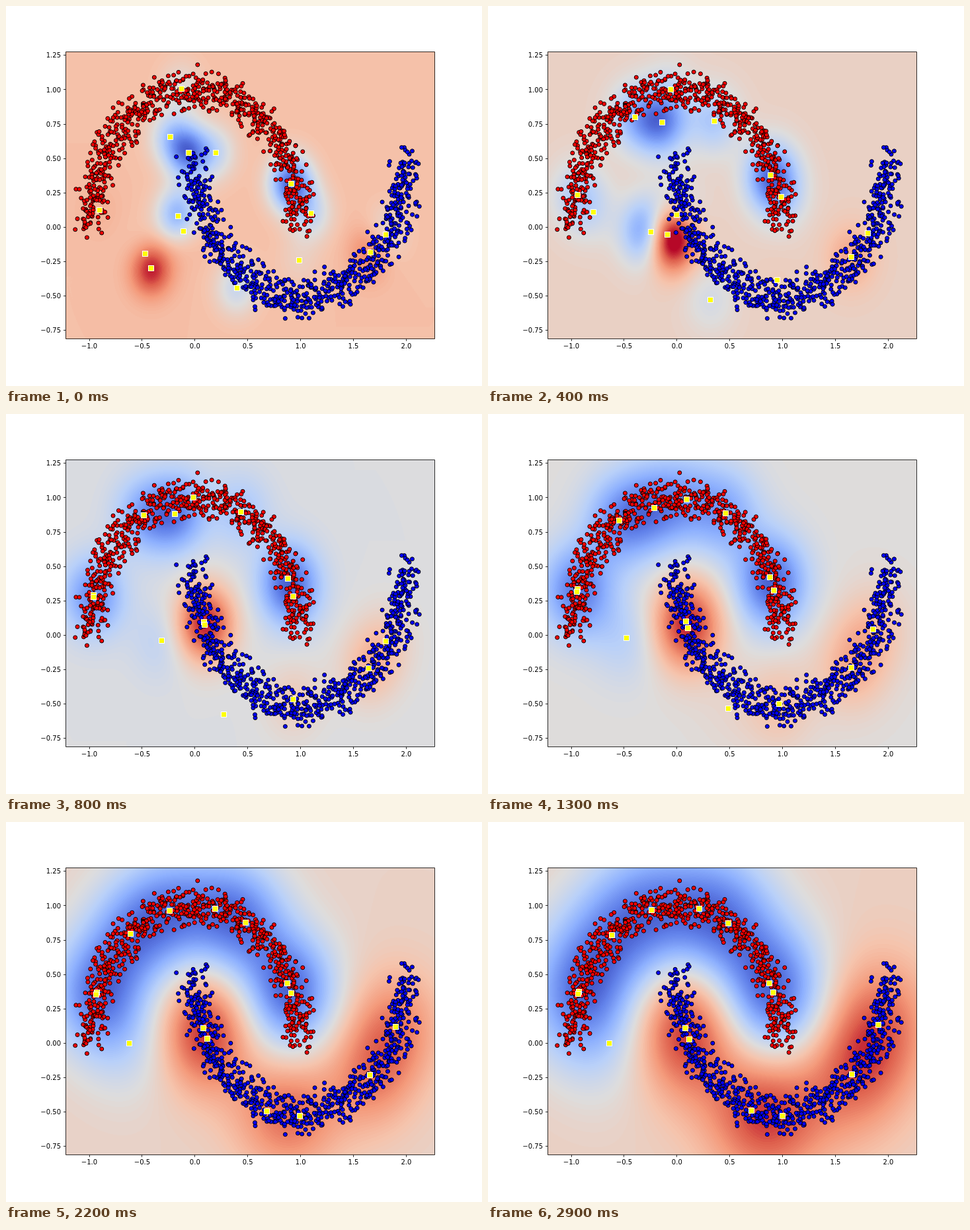
An HTML page with a canvas that plays this animation: 720x576 px, repeating every 3 s.

```html
<!DOCTYPE html>
<html lang="en">
<head>
<meta charset="utf-8">
<title>Two moons classifier</title>
<style>
  html, body { margin: 0; width: 100%; height: 100%; overflow: hidden; background: #fff; }
  canvas, svg { position: absolute; left: 0; top: 0; display: block; }
  text { font: 10px "DejaVu Sans", sans-serif; }
  .axes { fill: none; stroke: #000; stroke-width: .8; }
</style>
</head>
<body>
<canvas id="plot" width="720" height="576"></canvas>
<svg id="frame" width="720" height="576"></svg>
<script>
const STEP = 100, STEPS = 30, MID = 8, END = STEPS - 1;
const BOX = { x: 90, y: 69, w: 559, h: 436 };
const UNIT = { x: 159.8, y: 208.5 };
const px = x => 285.8 + x * UNIT.x;
const py = y => 335.4 - y * UNIT.y;

const clamp = s => Math.max(0, Math.min(1, s));
const mix = (a, b, s) => a + (b - a) * s;
const smooth = s => s * s * (3 - 2 * s);
const easeOut = power => s => 1 - (1 - s) ** power;
const approach = easeOut(1.5), settle = easeOut(2.5);

// The two half circles: their final field level and how the level gets there.
const UPPER = { color: '#f00', level: .05, ease: settle, at: (c, s) => [c, s] };
const LOWER = { color: '#00f', level: .92, ease: smooth, at: (c, s) => [1 - c, .5 - s] };

function onMoon(moon, degrees, radius = 1) {
  const a = degrees * Math.PI / 180;
  const [x, y] = moon.at(radius * Math.cos(a), radius * Math.sin(a));
  return { x: px(x), y: py(y) };
}

// An inducing point first reaches its moon, then settles along it.
function marker(moon, x, y, level, midLevel, mid, end, endLevel = moon.level) {
  const poses = [
    { x, y, level },
    { ...onMoon(moon, ...mid), level: midLevel },
    { ...onMoon(moon, ...end), level: endLevel }
  ];
  return t => {
    const early = t < MID, s = early ? t / MID : (t - MID) / (END - MID);
    const [a, b] = early ? poses : poses.slice(1);
    const move = early ? approach(s) : settle(s);
    return {
      x: mix(a.x, b.x, move),
      y: mix(a.y, b.y, move),
      level: mix(a.level, b.level, early ? approach(s) : moon.ease(s))
    };
  };
}

// Start position and level, level on arrival, then [angle, radius] on arrival and at rest.
const markers = [
  marker(UPPER, 265, 125, .5, .25, [91], [78]),
  marker(UPPER, 248, 198, .25, .15, [119], [128]),
  marker(UPPER, 276, 222, .03, .07, [102, .9], [104]),
  marker(UPPER, 317, 222, .35, .33, [64], [61]),
  marker(UPPER, 141, 309, .68, .15, [163], [158]),
  marker(UPPER, 210, 375, .82, .15, [164], [159]),
  marker(UPPER, 431, 269, .03, .05, [25, .97], [26.5, .98]),
  marker(UPPER, 461, 314, .35, .08, [17, .97], [22, .98]),
  marker(UPPER, 268, 341, .45, .44, [187, .32], [180, .64], .33),
  marker(LOWER, 260, 318, .28, .97, [24], [23]),
  marker(LOWER, 219, 397, .97, .97, [25], [28]),
  marker(LOWER, 349, 427, .43, .49, [56, 1.3], [73.5, 1.03]),
  marker(LOWER, 443, 385, .57, .59, [86, .97], [90, 1.03]),
  marker(LOWER, 551, 373, .77, .68, [131, .98], [132, .98]),
  marker(LOWER, 574, 346, .57, .65, [146, .97], [158, .98])
];

// Level of the empty field and length scale of the kernel.
const base = t => .64 - .15 * smooth(clamp((t - 3) / 2)) + .08 * smooth(clamp((t - 8) / 18));
const reach = t => .14 + .0072 * t;

// Diverging colour map in contour bands.
const STOPS = [
  [59, 76, 192], [98, 130, 234], [141, 176, 254], [184, 208, 249], [221, 221, 221],
  [245, 196, 173], [244, 154, 123], [222, 96, 77], [180, 4, 38]
];
const BANDS = 100;
const palette = Uint32Array.from({ length: BANDS }, (_, k) => {
  const p = (k + .5) / BANDS * 8, i = Math.floor(p);
  const [r, g, b] = STOPS[i].map((c, j) => Math.round(mix(c, STOPS[i + 1][j], p - i)));
  return (255 << 24 | b << 16 | g << 8 | r) >>> 0;
});

// Gaussian elimination; the matrix is positive definite.
function solve(m, v) {
  const n = v.length;
  for (let i = 0; i < n; i++) {
    for (let r = i + 1; r < n; r++) {
      const f = m[r][i] / m[i][i];
      for (let c = i; c < n; c++) m[r][c] -= f * m[i][c];
      v[r] -= f * v[i];
    }
  }
  for (let i = n - 1; i >= 0; i--) {
    for (let c = i + 1; c < n; c++) v[i] -= m[i][c] * v[c];
    v[i] /= m[i][i];
  }
  return v;
}

const plot = document.getElementById('plot').getContext('2d');
const image = plot.createImageData(BOX.w, BOX.h);
const pixels = new Uint32Array(image.data.buffer);

// Kernel interpolation of the marker levels over the whole plot.
function drawField(t, marks) {
  const zero = base(t), sx = reach(t) * UNIT.x, sy = reach(t) * UNIT.y;
  const bell = (d, s) => Math.exp(-d * d / (2 * s * s));
  const gram = marks.map((a, i) => marks.map((b, j) =>
    bell(a.x - b.x, sx) * bell(a.y - b.y, sy) + (i === j ? .02 : 0)));
  const weight = solve(gram, marks.map(p => p.level - zero));
  const cols = marks.map(p => Float32Array.from({ length: BOX.w }, (_, x) => bell(BOX.x + x + .5 - p.x, sx)));
  const row = new Float32Array(BOX.w);
  for (let y = 0; y < BOX.h; y++) {
    row.fill(zero);
    marks.forEach((p, i) => {
      const k = weight[i] * bell(BOX.y + y + .5 - p.y, sy), col = cols[i];
      if (Math.abs(k) < 1e-4) return;
      for (let x = 0; x < BOX.w; x++) row[x] += k * col[x];
    });
    for (let x = 0; x < BOX.w; x++) {
      const band = Math.floor(row[x] * BANDS);
      pixels[y * BOX.w + x] = palette[Math.max(0, Math.min(BANDS - 1, band))];
    }
  }
  plot.putImageData(image, BOX.x, BOX.y);
}

// Noisy samples of both moons, drawn once.
let seed = 11;
function random() {
  seed = seed + 0x6D2B79F5 | 0;
  let r = Math.imul(seed ^ seed >>> 15, 1 | seed);
  r = r + Math.imul(r ^ r >>> 7, 61 | r) ^ r;
  return ((r ^ r >>> 14) >>> 0) / 4294967296;
}
const layer = document.createElement('canvas');
layer.width = 720;
layer.height = 576;
const dots = layer.getContext('2d');

function scatter(moon, count = 750, noise = .08, limit = 2.3) {
  const floor = Math.exp(-limit * limit / 2);
  dots.fillStyle = moon.color;
  for (let i = 0; i < count; i++) {
    const p = onMoon(moon, 180 * i / (count - 1));
    const r = noise * Math.sqrt(-2 * Math.log(mix(1, floor, random())));
    const turn = random() * 2 * Math.PI;
    dots.beginPath();
    dots.arc(p.x + r * Math.cos(turn) * UNIT.x, p.y + r * Math.sin(turn) * UNIT.y, 3, 0, 7);
    dots.fill();
    dots.stroke();
  }
}
scatter(UPPER);
scatter(LOWER);

// Axes and tick labels, lines snapped to pixel centres.
const frame = document.getElementById('frame');
function add(name, attrs, text = '') {
  const el = document.createElementNS('http://www.w3.org/2000/svg', name);
  for (const key in attrs) el.setAttribute(key, attrs[key]);
  el.textContent = text;
  frame.append(el);
}
const label = (v, digits) => v.toFixed(digits).replace('-', '\u2212');
const snap = v => Math.floor(v) + .5;
const left = snap(BOX.x), top0 = snap(BOX.y), bottom = top0 + BOX.h - 1;
let path = `M${left} ${top0}h${BOX.w - 1}V${bottom}H${left}z`;
for (let v = -1; v <= 2; v += .5) {
  path += `M${snap(px(v))} ${bottom}v3.5`;
  add('text', { x: px(v), y: 519, 'text-anchor': 'middle' }, label(v, 1));
}
for (let v = -.75; v <= 1.25; v += .25) {
  path += `M${left} ${snap(py(v))}h-3.5`;
  add('text', { x: 83, y: Math.round(py(v) + 3.7), 'text-anchor': 'end' }, label(v, 2));
}
add('path', { class: 'axes', d: path });

function draw(t) {
  const marks = markers.map(at => at(t));
  drawField(t, marks);
  plot.drawImage(layer, 0, 0);
  plot.fillStyle = '#ff0';
  plot.strokeStyle = '#fff';
  for (const { x, y } of marks) {
    const square = [snap(x) - 4, snap(y) - 4, 8, 8];
    plot.fillRect(...square);
    plot.strokeRect(...square);
  }
}

let shown = -1;
function tick() {
  const t = Math.floor(performance.now() / STEP) % STEPS;
  if (t !== shown) draw(shown = t);
  requestAnimationFrame(tick);
}
tick();
</script>
</body>
</html>
```
